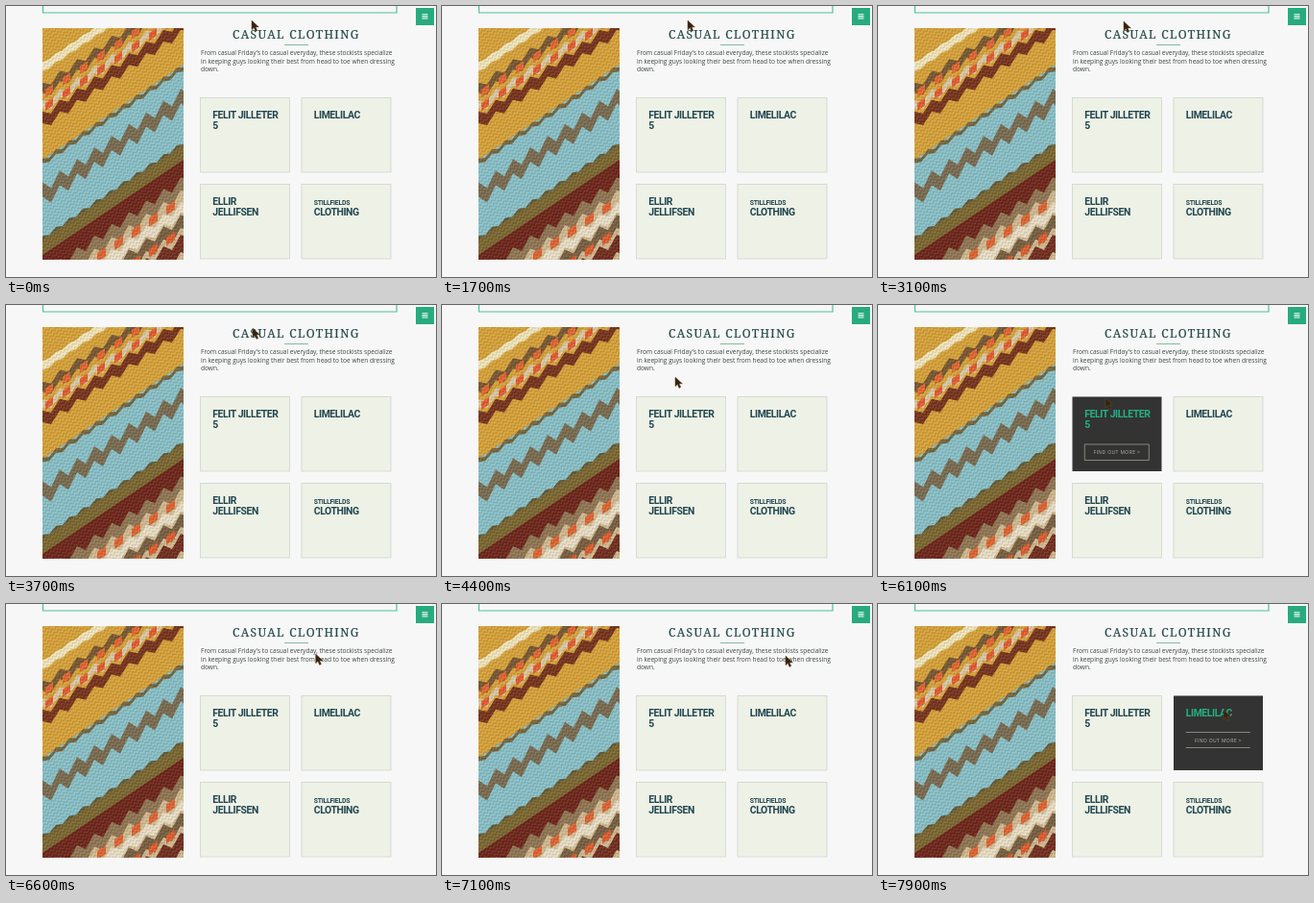
These frames come from a looping animation (448x282 px, 8 s). An HTML page:

```html
<!DOCTYPE html>
<html lang="en">
<head>
<meta charset="utf-8">
<title>Casual clothing</title>
<style>
html, body { margin: 0; height: 100%; overflow: hidden; background: #f7f7f7 }
svg { display: block; width: 100vw; height: 100vh }
.title { font: 700 10.4px Roboto, sans-serif; letter-spacing: -.4px }
.title .small { font-size: 6.9px; letter-spacing: -.25px }
.head { font: 500 12px "Noto Serif", serif; letter-spacing: 1.35px; fill: #274a4b; stroke: #274a4b; stroke-width: .2px }
.body { font: 6.59px "Open Sans", sans-serif; fill: #3d4643 }
.more { font: 5.1px "Open Sans", sans-serif; letter-spacing: .35px; fill: #b5b5a8 }
</style>
</head>
<body>
<svg viewBox="0 0 448 282">
  <defs>
    <clipPath id="photo"><path d="M38 23H185V264H38Z"/></clipPath>
    <pattern id="knit" width="5" height="4" patternUnits="userSpaceOnUse" patternTransform="rotate(-34)">
      <path d="M0 0L2.5 3L5 0" fill="none" stroke="#3a2415"/>
      <path d="M0 2L2.5 5L5 2M0 -2L2.5 1L5 -2" fill="none" stroke="#fff" stroke-width=".8"/>
    </pattern>
  </defs>
  <path d="M38.5 0V7H407V0" fill="none" stroke="#4cc19e" stroke-width="1.2"/>
  <path d="M427 2H446V20H427Z" fill="#27ab7e"/>
  <path d="M433.5 8.8H439.5M433.5 10.9H439.5M433.5 13H439.5" stroke="#fff" stroke-width="1.1"/>
  <g clip-path="url(#photo)">
    <g id="cloth" transform="translate(38 23) skewY(-34)" fill="none"></g>
    <path d="M38 23H185V264H38Z" fill="url(#knit)" opacity=".2"/>
  </g>
  <text class="head" x="302.3" y="34.3" text-anchor="middle">CASUAL CLOTHING</text>
  <path d="M290 40.5H315" stroke="#86b8a2"/>
  <g class="body">
    <text x="203" y="51">From casual Friday's to casual everyday, these stockists specialize</text>
    <text x="203" y="59.6">in keeping guys looking their best from head to toe when dressing</text>
    <text x="203" y="68.2">down.</text>
  </g>
  <g id="cards"></g>
  <path id="cursor" d="M0 0V9.8L2.3 7.6L4 11.4L5.8 10.6L4.1 6.9H7.4Z" fill="#33230f" stroke="#6b4a2a" stroke-width=".5"/>
</svg>
<script>
const $ = id => document.getElementById(id);

// Knitted cloth: slanted bands and zigzags; y is measured at the left edge
const band = (y, h, color) => `<rect y="${y}" width="147" height="${h}" fill="${color}"/>`;
const zigzag = (y, amp, step, width, color) => {
  let d = '';
  for (let i = -1; i * step < 160; i++) d += `${d ? 'L' : 'M'}${i * step} ${y + (i % 2 ? amp : -amp)}`;
  return `<path d="${d}" stroke="${color}" stroke-width="${width}"/>`;
};
const dots = (y, gap, size, color) =>
  `<path d="M3 ${y}H147" stroke="${color}" stroke-width="${size}" stroke-dasharray="${size} ${gap - size}"/>`;

$('cloth').innerHTML =
  band(0, 141, '#d6a136') + zigzag(41, 1, 7, 9, '#f1e6bb') +
  zigzag(66, 4, 9, 8, '#75552f') + dots(70, 18, 8, '#e4632d') +
  zigzag(83, 3, 9, 7, '#d9c9a4') + dots(84, 18, 8, '#e4592a') + zigzag(97, 4, 9, 9, '#743019') +
  band(137, 84, '#86c0c8') + zigzag(140, 2, 7, 4, '#71643c') +
  zigzag(174, 6, 9, 9, '#76694e') + zigzag(221, 2, 7, 5, '#645a35') +
  band(221, 17, '#78652d') + band(236, 32, '#6b2217') +
  band(264, 80, '#cfb990') + zigzag(264, 5, 9, 9, '#8d7451') +
  dots(277, 18, 9, '#e0602e') + zigzag(288, 4, 9, 8, '#e9dfc6') +
  zigzag(303, 5, 9, 9, '#745c3e') + dots(309, 18, 9, '#dd5a2b') + zigzag(326, 5, 9, 12, '#6e2a1b');

// Cards: [x, y, first line, second line, hover start, hover end]
const cards = [
  [202.5, 95.5, 'FELIT JILLETER', '5', 4600, 6200],
  [308, 95.5, 'LIMELILAC', '', 7500, 9000],
  [202.5, 185.5, 'ELLIR', 'JELLIFSEN'],
  [308, 185.5, 'STILLFIELDS', 'CLOTHING'],
].map(([x, y, first, second, start, end], i) => {
  const g = document.createElementNS('http://www.w3.org/2000/svg', 'g');
  const by = second ? 49.5 : 38;
  g.setAttribute('transform', `translate(${x} ${y})`);
  g.innerHTML = `<rect width="93" height="77.5" stroke="#d0d5cc" stroke-width=".8"/>
    <g class="title"><text x="12.8" y="21.3"${i == 3 ? ' class="small"' : ''}>${first}</text>
    <text x="12.8" y="32.2">${second}</text></g>
    <g class="button" opacity="0"><path d="M12.8 ${by}h67${second ? 'v16.5h-67z' : 'm0 16h-67'}"
      fill="none" stroke="#8f9186" stroke-width=".9"/>
    <text class="more" x="46.4" y="${by + 10.2}" text-anchor="middle">FIND OUT MORE &gt;</text></g>`;
  $('cards').append(g);
  return { box: g.querySelector('rect'), title: g.querySelector('.title'), button: g.querySelector('.button'), start, end };
});

// Pointer tip: [time, x, y]
const path = [
  [0, 256, 15], [3000, 256, 15], [3200, 256, 17], [3300, 256, 17], [3700, 257, 24], [3800, 257, 26],
  [3900, 257, 26], [4400, 243, 75], [4800, 221, 111], [5000, 219, 113], [5400, 220, 115],
  [5800, 220, 115], [6100, 237, 97], [6400, 288, 62], [6700, 340, 47], [7100, 358, 54],
  [7600, 360, 104], [7900, 360, 110], [8000, 360, 110],
];
const clamp = v => Math.max(0, Math.min(1, v));
const mix = (a, b, k) => `rgb(${a.map((v, i) => Math.round(v + (b[i] - v) * k))})`;

function draw(now) {
  const t = Math.floor(now % 8000 / 100) * 100;
  const n = path.findIndex(p => p[0] > t);
  const [a, b] = [path[n - 1], path[n]];
  const k = (t - a[0]) / (b[0] - a[0]);
  $('cursor').setAttribute('transform', `translate(${a[1] + (b[1] - a[1]) * k} ${a[2] + (b[2] - a[2]) * k})`);
  for (const c of cards) {
    const h = c.start ? clamp((t - c.start) / 300) * clamp(1 - (t - c.end) / 300) : 0;
    c.box.setAttribute('fill', mix([238, 241, 230], [51, 51, 51], h));
    c.box.setAttribute('stroke-opacity', 1 - h);
    c.title.setAttribute('fill', mix([32, 70, 79], [35, 177, 130], h));
    c.button.setAttribute('opacity', h);
  }
  requestAnimationFrame(draw);
}
requestAnimationFrame(draw);
</script>
</body>
</html>
```
